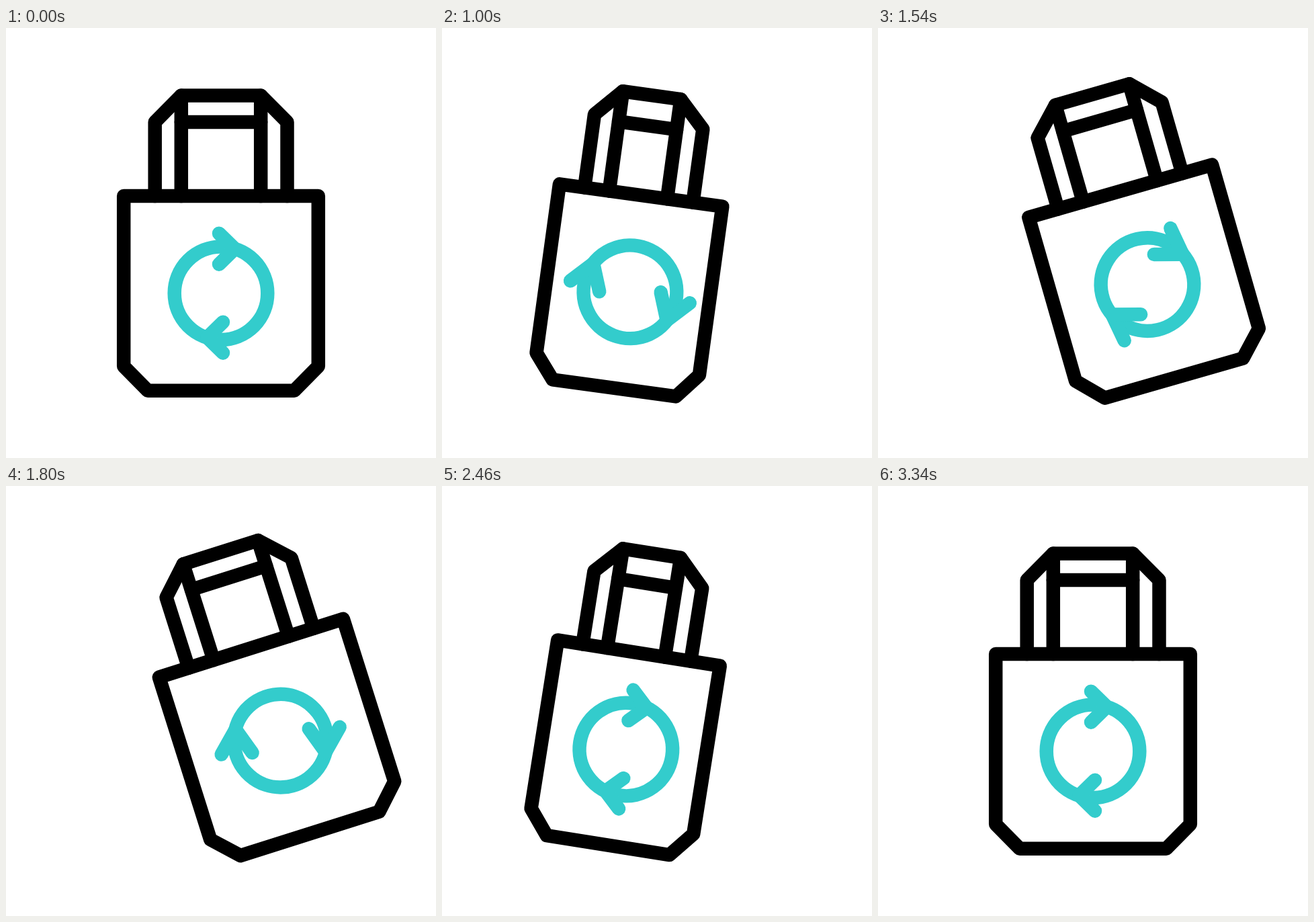
Write an HTML page with a canvas that moves like this. It is 640 px wide and 640 px high and loops after 3600 ms.

```html
<!DOCTYPE html>
<html lang="en">
<head>
<meta charset="utf-8">
<title>Reusable bag</title>
<style>
  html, body { margin: 0; width: 100%; height: 100%; overflow: hidden; background: #fff; }
  canvas { display: block; width: 640px; height: 640px; }
</style>
</head>
<body>
<canvas id="stage" width="640" height="640"></canvas>
<script>
const ctx = document.getElementById('stage').getContext('2d');
const LOOP = 3600, STEP = 20;
const PIVOT = [314, 100];
const RAD = Math.PI / 180;

// Keys are [time, value], eased in and out between neighbours.
const SWING = [[200, 0], [900, 9], [1700, -18.9], [2455, 9], [3345, 0]];
const TURN = [[200, 0], [985, 1], [1700, 0], [2455, 1], [3345, 0]];
const SPIN = [[200, 0], [2470, 360]];
const STRETCH = [[200, 0], [560, 12.5], [2060, 12.5], [2490, 0]];

function track(keys, t) {
  if (t <= keys[0][0]) return keys[0][1];
  for (let i = 1; i < keys.length; i++) {
    const [t0, a] = keys[i - 1], [t1, b] = keys[i];
    if (t < t1) {
      const x = (t - t0) / (t1 - t0);
      return a + (b - a) * x * x * (3 - 2 * x);
    }
  }
  return keys[keys.length - 1][1];
}

function line(points, closed) {
  ctx.beginPath();
  points.forEach(([x, y]) => ctx.lineTo(x, y));
  if (closed) ctx.closePath();
  ctx.stroke();
}

// Bag coordinates: x from its middle, y from the top of the handle.
function drawBag(turn) {
  const left = -144.8 + 19 * turn, right = 144.8 - 26 * turn;
  const footL = -109 + 12.4 * turn, footR = 109 - 20.5 * turn;
  const outL = -98.3 + 10 * turn, outR = 98.5 - 24 * turn;
  const inL = -59.2 + 8 * turn, inR = 59.2 - 23.5 * turn;
  const bar = 40 + 5.8 * turn;
  ctx.strokeStyle = '#000';
  line([[left, 150], [right, 150], [right, 403.5], [footR, 439.7],
        [footL, 439.7], [left, 403.5]], true);
  line([[outL, 150], [outL, 40], [inL, 0.4], [inR, 0.4], [outR, 40], [outR, 150]]);
  line([[inL, 0.4], [inL, 150]]);
  line([[inR, 0.4], [inR, 150]]);
  line([[inL, bar], [inR, bar]]);
}

function drawCycle(spin, stretch) {
  ctx.save();
  ctx.translate(0, 294.7);
  ctx.rotate(spin * RAD);
  ctx.strokeStyle = '#33cccc';
  ctx.beginPath();
  ctx.arc(0, 0, 69.3, 0, 2 * Math.PI);
  ctx.stroke();
  const tail = -3 - stretch;
  for (const side of [1, -1]) {
    line([[tail, -89], [20.5, -66], [tail, -43]].map(([x, y]) => [x * side, y * side]));
  }
  ctx.restore();
}

function draw(t) {
  ctx.fillStyle = '#fff';
  ctx.fillRect(0, 0, 640, 640);
  ctx.lineWidth = 20.5;
  ctx.lineJoin = ctx.lineCap = 'round';
  ctx.save();
  ctx.translate(...PIVOT);
  ctx.rotate(track(SWING, t) * RAD);
  ctx.translate(320 - PIVOT[0], 0);
  drawBag(track(TURN, t));
  drawCycle(track(SPIN, t), track(STRETCH, t));
  ctx.restore();
}

const start = performance.now();
function tick() {
  const t = (performance.now() - start) % LOOP;
  draw(Math.floor(t / STEP) * STEP);
  requestAnimationFrame(tick);
}
tick();
</script>
</body>
</html>
```
